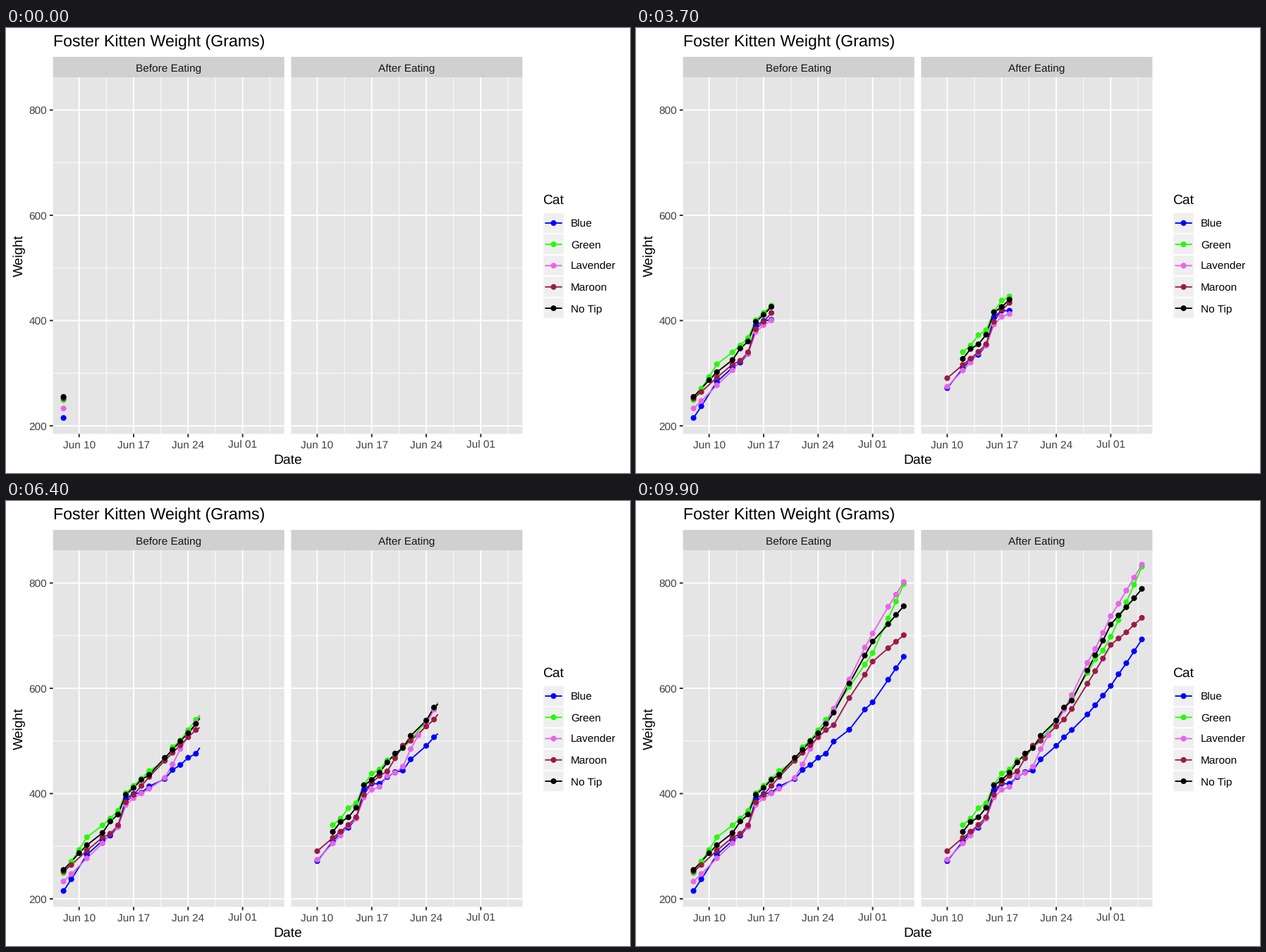
Recreate the animation shown at these times as a matplotlib script. Size 885 by 632 pixels, loop 10000 ms.

```python
import matplotlib.pyplot as plt
import numpy as np
from matplotlib.animation import FuncAnimation
from matplotlib.patches import Circle, Rectangle

W, H, DPI = 885, 632, 100
FRAMES, LAST_DAY = 100, 27
PX = 72 / DPI  # points per pixel

plt.rcParams["font.family"] = "Liberation Sans"
plt.rcParams["text.hinting"] = "none"

# Colour, days missed before and after meals, grams on the key days.
KEY_DAYS = [0, 3, 7, 8, 13, 18, 23, 27]
CATS = {
    "Blue": ("#0000ff", {2}, {15}, [215, 282, 337, 392, 427, 493, 574, 660]),
    "Green": ("#24fb06", set(), {2, 15}, [249, 315, 366, 403, 466, 556, 667, 798]),
    "Lavender": ("#e566ea", {2}, set(), [233, 277, 336, 378, 430, 559, 706, 802]),
    "Maroon": ("#9b1a47", {2}, {15}, [252, 292, 337, 381, 465, 532, 651, 701]),
    "No Tip": ("#000000", {1}, {2, 15}, [255, 302, 358, 398, 467, 551, 689, 756]),
}
NO_BEFORE = {4, 12, 19, 21, 24}
NO_AFTER = {0, 1, 3, 19}

LEFT, RIGHT = 66.7, 404.4
PANEL_W, TOP, BOTTOM, STRIP_TOP = 328, 70.2, 576.4, 41
DAY_W = PANEL_W / (LAST_DAY * 1.1)
LINE, DOT = 1.87, 8.1
TICK, TICK_TEXT = "#262626", "#404040"

rng = np.random.default_rng(4)
fig = plt.figure(figsize=(W / DPI, H / DPI), dpi=DPI, facecolor="white")
ax = fig.add_axes([0, 0, 1, 1])
ax.set(xlim=(0, W), ylim=(H, 0))
ax.axis("off")


def day_x(left, day):
    return left + (day + LAST_DAY * 0.05) * DAY_W


def gram_y(grams):
    return 565 - (grams - 200) * 0.7475


def weigh(key_grams, days, fed):
    """Growth with a little daily wobble, plus a meal that gets bigger with age."""
    grams = np.interp(days, KEY_DAYS, key_grams)
    grams += 3 * np.sin(np.pi * days / LAST_DAY) * rng.standard_normal(len(days))
    return grams + fed * (10 + 0.85 * days)


def rect(x0, y0, x1, y1, color, **kw):
    ax.add_patch(Rectangle((x0, y0), x1 - x0, y1 - y0, facecolor=color,
                           snap=False, **kw))


def line(xs, ys, color, width=LINE, z=2):
    return ax.plot(xs, ys, color=color, lw=width * PX, zorder=z, snap=False,
                   solid_capstyle="butt", solid_joinstyle="round")[0]


def dot(x, y, color):
    return ax.add_patch(Circle((x, y), DOT / 2, color=color, lw=0, zorder=4))


def text(x, y, s, size, color="black", ha="left", **kw):
    ax.text(x, y, s, fontsize=size * PX, color=color, ha=ha, va="baseline", **kw)


def draw_panel(left, title):
    right = left + PANEL_W
    rect(left, STRIP_TOP, right, TOP, "#d0d0d0", lw=0)
    rect(left, TOP, right, BOTTOM, "#e5e5e5", lw=0)
    text((left + right) / 2, 61.4, title, 15.4, "#141414", "center")
    for k, grams in enumerate(range(200, 801, 100)):
        line([left, right], [gram_y(grams)] * 2, "white", LINE / (1 + k % 2), 1)
    for k in range(8):
        x = day_x(left, 2 + 3.5 * k)
        line([x, x], [TOP, BOTTOM], "white", LINE / (1 + k % 2), 1)
    for k, label in enumerate(("Jun 10", "Jun 17", "Jun 24", "Jul 01")):
        x = day_x(left, 2 + 7 * k)
        line([x, x], [BOTTOM, BOTTOM + 4.8], TICK)
        text(x, 596.5, label, 15.4, TICK_TEXT, "center")


def draw_legend():
    text(761.3, 250.3, "Cat", 19.25)
    for k, (name, (color, *_)) in enumerate(CATS.items()):
        y = 277 + 30.24 * k
        rect(761.5, y - 15.12, 791.7, y + 15.12, "#efefef",
             edgecolor="white", lw=LINE * PX)
        line([764.5, 788.7], [y, y], color)
        dot(776.6, y, color)
        text(801, y + 5.5, name, 15.4)


class Series:
    """One cat's growth in one panel, revealed along the date axis."""

    def __init__(self, left, days, grams, color):
        self.keys = np.round(days * (FRAMES - 1) / LAST_DAY)
        self.x, self.y = day_x(left, days), gram_y(grams)
        self.line = line([], [], color, z=3)
        self.dots = [dot(x, y, color) for x, y in zip(self.x, self.y)]

    def show(self, i):
        n = np.searchsorted(self.keys, i, side="right")
        x, y = self.x[:n], self.y[:n]
        if n:
            x = np.append(x, np.interp(i, self.keys, self.x))
            y = np.append(y, np.interp(i, self.keys, self.y))
        self.line.set_data(x, y)
        for k, d in enumerate(self.dots):
            d.set_visible(k < n)


text(LEFT, 26.3, "Foster Kitten Weight (Grams)", 23.15)
text(399.6, 618.8, "Date", 19.25, ha="center")
text(24, 323.4, "Weight", 19.25, ha="center", rotation=90, rotation_mode="anchor")
draw_panel(LEFT, "Before Eating")
draw_panel(RIGHT, "After Eating")
for grams in range(200, 801, 200):
    y = gram_y(grams)
    line([LEFT - 4.8, LEFT], [y, y], TICK)
    text(57.8, y + 5.5, str(grams), 15.4, TICK_TEXT, "right")
draw_legend()

series = []
for color, no_before, no_after, key_grams in CATS.values():
    for left, missed, fed in ((LEFT, NO_BEFORE | no_before, False),
                              (RIGHT, NO_AFTER | no_after, True)):
        days = np.array([d for d in range(LAST_DAY + 1) if d not in missed])
        series.append(Series(left, days, weigh(key_grams, days, fed), color))


def update(i):
    for s in series:
        s.show(i)
    return []


anim = FuncAnimation(fig, update, frames=FRAMES, interval=100, repeat=True,
                     repeat_delay=0, blit=False)
plt.show()
```
